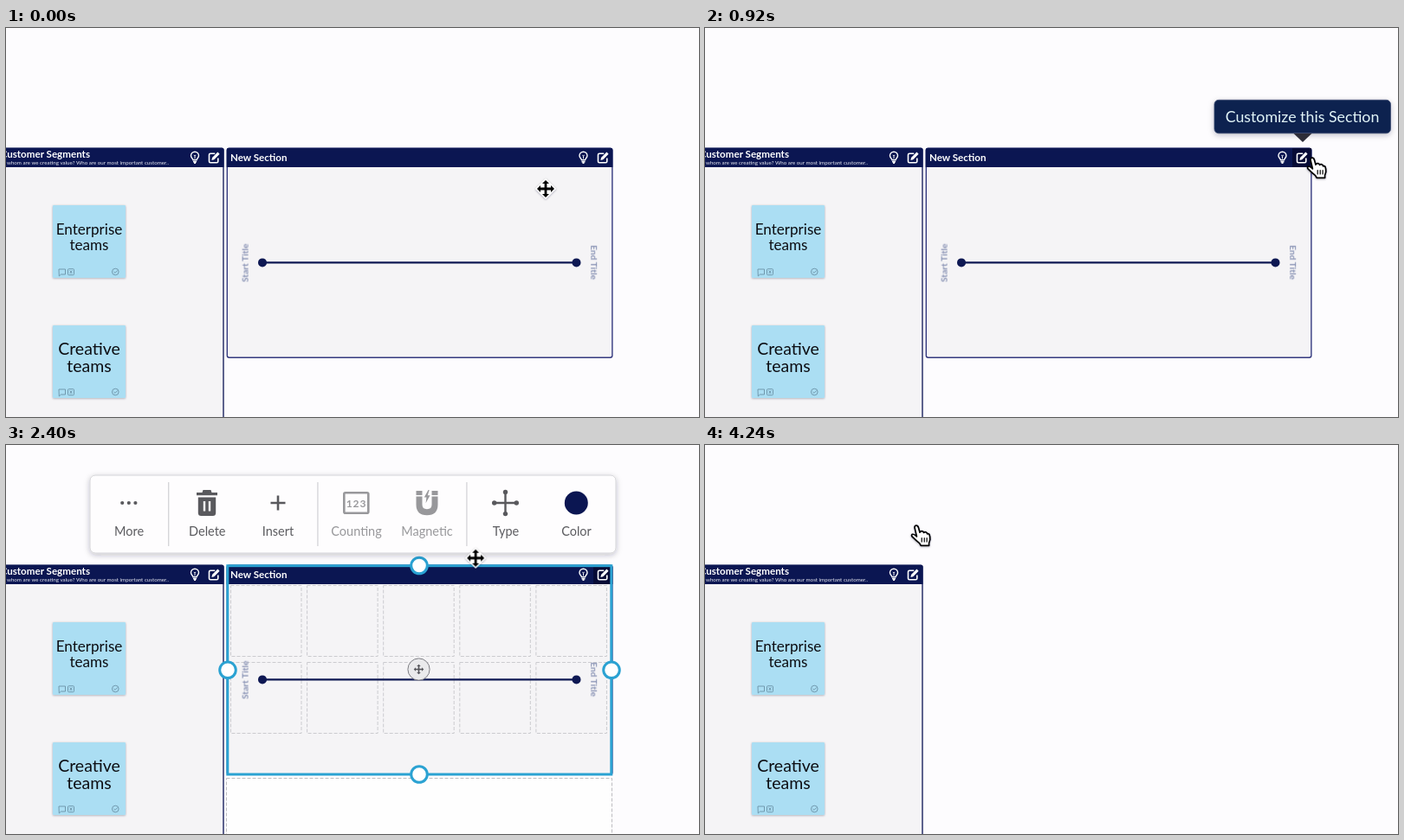
Write an HTML page that moves like this. It is 800 px wide and 450 px high and loops after 4.4 s.

```html
<!DOCTYPE html>
<html lang="en">
<head>
<meta charset="utf-8">
<title>Delete a section</title>
<style>
  html, body { margin: 0; width: 100%; height: 100%; overflow: hidden; background: #fdfcfe; }
  svg { display: block; width: 800px; height: 450px; font-family: Lato, "Open Sans", sans-serif; }
  .mid { text-anchor: middle; }
  .end { text-anchor: end; }
  .bold { font-weight: 700; }
  .label { font-size: 14.5px; fill: #5c5c60; text-anchor: middle; }
  .off { fill: #98989b; }
  .axis { font-size: 10.2px; font-weight: 700; fill: #8791b3; text-anchor: middle; }
  .dash { fill: none; stroke: #cbcbcf; stroke-dasharray: 4 2; }
  .line { fill: none; stroke: currentColor; }
  .knob { fill: #fff; stroke: #2ba2d2; stroke-width: 3; }
  #tip, #bar, #panel, #picked, #hot, #glow { opacity: 0; }
</style>
</head>
<body>
<svg viewBox="0 0 800 450">
  <defs>
    <filter id="soft" x="-20%" y="-20%" width="140%" height="150%">
      <feDropShadow dx="0" dy="2" stdDeviation="3" flood-color="#223" flood-opacity=".25"/>
    </filter>
    <filter id="near" x="-20%" y="-20%" width="140%" height="140%">
      <feDropShadow dx="0" dy=".7" stdDeviation="1.3" flood-color="#223" flood-opacity=".35"/>
    </filter>
    <g id="bulb" class="line" color="#fff" stroke-width="1.4">
      <path d="M-2 3.2C-2 1.8-4.5 1-4.5-1.7A4.5 4.5 0 0 1 4.5-1.7C4.5 1 2 1.8 2 3.2ZM-2 5.2H2M-1 6.8H1"/>
      <path d="M-1.2-2.6 0-1.4 1.2-2.6M0-1.4V2" stroke-width=".9"/>
    </g>
    <g id="edit" color="#fff">
      <path class="line" stroke-width="1.6" d="M1.2-4.7H-4Q-5.5-4.7-5.5-3.2V4.3Q-5.5 5.8-4 5.8H3.3Q4.8 5.8 4.8 4.3V.5"/>
      <path fill="#fff" d="M-2.6 3 -2 0 4.4-6.4 6.6-4.2.3 2.2Z"/>
    </g>
    <g id="note">
      <rect width="84" height="84" rx="1" fill="#abdef3" filter="url(#near)"/>
      <g class="line" color="#7199ae" stroke-width="1">
        <path d="M7 74H14.5V80H9.5L7.3 82Z"/>
        <rect x="17.5" y="73.7" width="7" height="7" rx="1"/>
        <path d="M19.6 75.5 22.4 79M22.4 75.5 19.6 79"/>
        <circle cx="72.3" cy="77" r="3.8"/>
        <path d="M70.5 77 72 78.4 74.5 75.6"/>
      </g>
    </g>
    <path id="arrows" d="M0-10 4-6H1.4V-1.4H6V-4L10 0 6 4V1.4H1.4V6H4L0 10-4 6H-1.4V1.4H-6V4L-10 0-6-4V-1.4H-1.4V-6H-4Z"/>
    <path id="half" d="M12 0 6-6V-1.4H2.8V-10H.9V10H2.8V1.4H6V6Z"/>
  </defs>

  <rect width="800" height="450" fill="#fdfcfe"/>

  <!-- left section -->
  <rect x="-20" y="139.2" width="271" height="330" rx="2" fill="#f5f4f6" stroke="#1b2460" stroke-width="1.4"/>
  <path d="M-20 138.7H249.5Q251.5 138.7 251.5 140.7V161H-20Z" fill="#0b1652"/>
  <text class="end bold" x="97" y="150.2" font-size="11.6" fill="#fff">Customer Segments</text>
  <text class="end" x="188" y="158.3" font-size="6.2" fill="#e8e9f2">For whom are we creating value? Who are our most important customer..</text>
  <use href="#bulb" x="218" y="149.5"/>
  <use href="#edit" x="240" y="150"/>
  <use href="#note" x="54" y="205"/>
  <use href="#note" x="54" y="344"/>
  <g class="mid" fill="#0c0d12">
    <text x="96" y="239.3" font-size="17.1">Enterprise</text>
    <text x="96" y="257" font-size="17.1">teams</text>
    <text x="96" y="378" font-size="19.5">Creative</text>
    <text x="96" y="398" font-size="19.5">teams</text>
  </g>

  <!-- new section -->
  <g id="section">
    <rect x="255.3" y="139.2" width="444.6" height="242" rx="2.5" fill="#f5f4f6" stroke="#34397f" stroke-width="1.4"/>
    <path d="M254.7 161V141Q254.7 138.7 257 138.7H698Q700.4 138.7 700.4 141V161Z" fill="#0b1652"/>
    <text class="bold" x="259" y="153.7" font-size="11.6" fill="#fff">New Section</text>
    <rect id="hot" x="678" y="139" width="22" height="22" fill="#060a35"/>
    <use href="#bulb" x="666.5" y="149.5"/>
    <use href="#edit" x="689" y="150"/>
    <g id="cells"></g>
    <path d="M296 271.4H658" stroke="#0e1853" stroke-width="2.2"/>
    <circle cx="296" cy="271.4" r="5" fill="#0e1853"/>
    <circle cx="658.5" cy="271.4" r="5" fill="#0e1853"/>
    <text class="axis" transform="translate(279.6 271.7) rotate(-90)">Start Title</text>
    <text class="axis" transform="translate(675.2 271.2) rotate(90)">End Title</text>
  </g>

  <g id="picked">
    <rect class="dash" x="254.5" y="385.5" width="445" height="90" style="fill:#fefefe;stroke:#bcbcc0"/>
    <rect x="255.8" y="139.7" width="443" height="241.3" fill="none" stroke="#2ba2d2" stroke-width="3"/>
    <circle cx="476.5" cy="259.5" r="12.6" fill="#eaeaec" stroke="#7c7c82"/>
    <use href="#arrows" transform="translate(476.5 259.5) scale(.58)" fill="#55555a"/>
    <path id="bar" d="M694.5 450V139Q694.5 136 697.5 136H702Q705 136 705 139V450Z" fill="#1c84b3"/>
    <g id="knobs"></g>
  </g>

  <!-- toolbar -->
  <g id="panel">
    <rect x="97" y="35" width="607" height="90" rx="6" fill="#fefdfe" stroke="#d3d3d7" filter="url(#soft)"/>
    <path d="M187.7 43V117M359.9 43V117M531.9 43V117" stroke="#d4d4d7" stroke-width="1.3"/>
    <rect id="glow" x="196" y="43" width="74" height="74" rx="5" fill="#f9dfda"/>
    <g fill="#59595d">
      <circle cx="134.2" cy="67" r="2.1"/><circle cx="141.8" cy="67" r="2.1"/><circle cx="149.4" cy="67" r="2.1"/>
    </g>
    <g id="trash" fill="#59595d">
      <path fill-rule="evenodd" d="M220 55H226.5L227.5 52H236.5L237.5 55H244V58.2H220ZM221.8 60.5H242.2V78.5Q242.2 82 238.7 82H225.3Q221.8 82 221.8 78.5ZM227.8 65V76.5H230.2V65ZM233.8 65V76.5H236.2V65Z"/>
      <text x="232.3" y="105.3" font-size="14.5" class="mid">Delete</text>
    </g>
    <path d="M305.5 67H322.5M314 58.5V75.5" stroke="#59595d" stroke-width="2.6"/>
    <rect x="390.3" y="55.3" width="28" height="23.5" rx="1.5" fill="none" stroke="#98989b" stroke-width="2.6"/>
    <text class="mid bold off" x="404.6" y="71.5" font-size="12" letter-spacing="1">123</text>
    <path d="M477 53V69Q477 77.7 486 77.7T495 69V53" fill="none" stroke="#98989b" stroke-width="7"/>
    <path d="M472.5 58.7H481.5M490.5 58.7H499.5" stroke="#fff" stroke-width="1.6"/>
    <path d="M487.5 52 482.8 60.6H485.4L484.6 67.2 489.5 58.3H486.7L488.7 52Z" fill="#98989b"/>
    <path d="M563.5 67H589.5M576.5 54V80" stroke="#59595d" stroke-width="2.4"/>
    <g fill="#59595d">
      <circle cx="563.7" cy="67" r="2.7"/><circle cx="589.3" cy="67" r="2.7"/>
      <circle cx="576.5" cy="54.4" r="2.7"/><circle cx="576.5" cy="79.6" r="2.7"/>
    </g>
    <circle cx="658.3" cy="67" r="13.5" fill="#0b1652"/>
    <text class="label" x="142" y="105.3">More</text>
    <text class="label" x="314" y="105.3">Insert</text>
    <text class="label off" x="404.5" y="105.3">Counting</text>
    <text class="label off" x="486" y="105.3">Magnetic</text>
    <text class="label" x="577" y="105.3">Type</text>
    <text class="label" x="658.5" y="105.3">Color</text>
  </g>

  <g id="tip">
    <rect x="588" y="83.3" width="203.5" height="38.5" rx="5" fill="#0d2350" stroke="#3a4a70" stroke-width=".8" filter="url(#soft)"/>
    <path d="M679.5 122H700.5L690 132Z" fill="#2d2d38"/>
    <text class="mid" x="689.5" y="108.6" font-size="17.8" fill="#e2f5f8">Customize this Section</text>
  </g>

  <g id="cursor">
    <g id="move" filter="url(#near)">
      <path d="M0-11.5 11.5 0 0 11.5-11.5 0Z" fill="#fff" stroke="#fff" stroke-linejoin="round"/>
      <use href="#arrows"/>
    </g>
    <g id="hand" filter="url(#near)">
      <g transform="translate(4 11)" stroke="#000" stroke-width="1.7" stroke-linejoin="round" stroke-linecap="round">
        <path fill="#fff" d="M-6.8-8.6Q-7.6-11.5-5.2-11.8-3.3-11.9-2.5-9.3L-1-3.8Q.1-5.8 2-5.2 3.2-4.8 3.6-3.6 5-4.9 6.3-4 7.3-3.5 7.6-2.2 9-2.8 10-1.4 11 1 10.8 4.5L9.6 8.2V11.3H.2L-1.4 8.6Q-6 5-9.7 1.2-11.2-.6-9.8-1.6-7.8-2.4-4.6.8Z"/>
        <path d="M1.2 2.5V7M4.2 2.5V7M7.1 2.5V7" stroke-width="1.2"/>
      </g>
    </g>
    <g id="size" stroke="#fff" stroke-width="2.6" paint-order="stroke" stroke-linejoin="round">
      <use href="#half"/>
      <use href="#half" transform="scale(-1 1)"/>
    </g>
  </g>
</svg>
<script>
  const LOOP = 4400;
  const CLICK = 1360, RESIZE = 1720, LEAVE = 2260, OVER = 2680, GONE = 3920;
  const $ = id => document.getElementById(id);

  let cells = '';
  for (let i = 0; i < 10; i++) {
    const x = 259.5 + (i % 5) * 88.1, y = i < 5 ? 162.5 : 251.5;
    cells += `<rect class="dash" x="${x}" y="${y}" width="81.5" height="82"/>`;
  }
  $('cells').innerHTML = cells;
  $('knobs').innerHTML = [[477, 139.5], [256, 260.3], [699, 260.3], [477, 381]]
    .map(([x, y]) => `<circle class="knob" cx="${x}" cy="${y}" r="9.3"/>`).join('');

  // rows: [time, value, easing towards the next row]
  function play(id, prop, rows) {
    const last = rows[rows.length - 1];
    const all = last[0] < LOOP ? [...rows, [LOOP, last[1]]] : rows;
    const frames = all.map(([t, value, easing = 'step-end']) =>
      ({ offset: t / LOOP, [prop]: value, easing }));
    $(id).animate(frames, { duration: LOOP, iterations: Infinity });
  }
  const at = (x, y) => `translate(${x}px, ${y}px)`;
  const show = (id, ...times) =>
    play(id, 'opacity', [[0, 0], ...times.map((t, i) => [t, 1 - i % 2])]);

  play('cursor', 'transform', [
    [0, at(623, 186)],
    [20, at(623, 186), 'cubic-bezier(.4,0,.4,1)'],
    [480, at(697, 163), 'ease-out'],
    [640, at(702, 151), 'linear'],
    [1600, at(702, 151), 'linear'],
    [RESIZE, at(700, 150)],
    [2230, at(700, 150), 'cubic-bezier(.4,0,.3,1)'],
    [2760, at(250, 95), 'ease-out'],
    [3100, at(245, 94)]
  ]);
  play('move', 'opacity', [[0, 1], [520, 0], [LEAVE, 1], [2440, 0]]);
  show('hand', 520, RESIZE, 2440);
  show('size', RESIZE, LEAVE);

  show('hot', 520, GONE);
  play('tip', 'opacity', [[0, 0], [530, 0, 'ease-out'], [660, 1], [CLICK, 1, 'linear'], [CLICK + 80, 0]]);
  play('panel', 'opacity', [[0, 0], [CLICK, 0, 'ease-out'], [CLICK + 120, 1], [GONE, 0]]);
  show('picked', CLICK, GONE);
  show('cells', CLICK, GONE);
  show('bar', RESIZE, LEAVE);
  play('section', 'opacity', [[0, 1], [GONE, 0]]);

  play('glow', 'opacity', [[0, 0], [OVER, 0, 'linear'], [OVER + 150, 1]]);
  play('trash', 'fill', [[0, '#59595d'], [OVER, '#59595d', 'ease-out'], [OVER + 150, '#ec6852']]);
</script>
</body>
</html>
```
